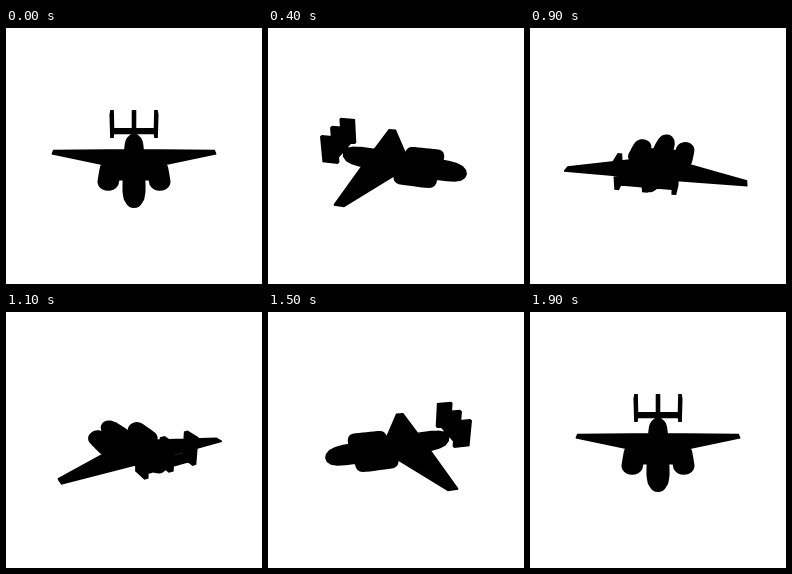
These frames come from a looping animation (256x256 px, 2000 ms). An HTML page:

```html
<!DOCTYPE html>
<html lang="en">
<head>
<meta charset="utf-8">
<title>Turning aircraft</title>
<style>
  html, body { margin: 0; width: 100%; height: 100%; overflow: hidden; background: #fff; }
  svg { display: block; width: 100%; height: 100%; }
</style>
</head>
<body>
<svg viewBox="0 0 256 256"><path id="plane"/></svg>
<script>
const STEP_MS = 100, STEPS = 20;
const CAMERA = 387, SIN_PITCH = 0.45, COS_PITCH = Math.sqrt(1 - SIN_PITCH ** 2);
const CENTER_X = 128, CENTER_Y = 135.4;

// Model axes: x along the wings, y up, z towards the nose.
const range = (count, fn) => Array.from({ length: count }, (_, i) => fn(i));

const ring = (x, y, z, rx, ry) => range(20, i => {
  const a = i * Math.PI / 10;
  return [x + rx * Math.cos(a), y + ry * Math.sin(a), z];
});

// Blunt-ended body along z, cut into convex sections; slope tilts its axis.
function pod({ x, y, tail, nose, radius, widen = 1, slope = 0 }) {
  const mid = (tail + nose) / 2, half = (nose - tail) / 2, sections = 16;
  const rings = range(sections + 1, i => {
    const u = -Math.cos(i * Math.PI / sections);
    const z = mid + half * u;
    const r = radius * Math.sqrt(Math.max(0, 1 - u ** 8));
    return ring(x, y + slope * z, z, r * widen, r);
  });
  return rings.slice(1).map((r, i) => [...rings[i], ...r]);
}

const box = (x0, x1, y0, y1, z0, z1) =>
  [x0, x1].flatMap(x => [y0, y1].flatMap(y => [z0, z1].map(z => [x, y, z])));

const fin = (x0, x1) => box(x0, x1, 6, 33, -67, -51);

const mirror = part => part.map(([x, y, z]) => [-x, y, z]);

const wing = [...box(0, 0, -1.5, 1.5, -31, 15), ...box(86.5, 86.5, -0.7, 0.7, -31, -22)];

const rightSide = [
  wing,
  fin(22.5, 26.5),
  ...pod({ x: 23.5, y: 0, tail: 4, nose: 45, radius: 8, widen: 1.25 })
];

const parts = [
  ...pod({ x: 0, y: 1, tail: -56, nose: 70.5, radius: 10.5, slope: -0.056 }),
  ...rightSide,
  ...rightSide.map(mirror),
  box(-22, 22, -1, 1, 0, 33),
  box(-25, 25, 10, 12, -66, -52),
  fin(-2.5, 2.5)
];

function project([x, y, z], sin, cos) {
  const side = x * cos + z * sin;
  const near = z * cos - x * sin;
  const scale = CAMERA / (CAMERA - near * COS_PITCH - y * SIN_PITCH);
  return [
    CENTER_X + side * scale,
    CENTER_Y - (y * COS_PITCH - near * SIN_PITCH) * scale
  ];
}

function hull(points) {
  const sorted = [...points].sort((a, b) => a[0] - b[0] || a[1] - b[1]);
  const chain = list => {
    const out = [];
    for (const p of list) {
      while (out.length > 1) {
        const [a, b] = out.slice(-2);
        if ((b[0] - a[0]) * (p[1] - a[1]) - (b[1] - a[1]) * (p[0] - a[0]) > 0) break;
        out.pop();
      }
      out.push(p);
    }
    return out.slice(0, -1);
  };
  return [...chain(sorted), ...chain(sorted.reverse())];
}

function outline(angle) {
  const sin = Math.sin(angle), cos = Math.cos(angle);
  return parts.map(part => {
    const edge = hull(part.map(p => project(p, sin, cos)));
    return 'M' + edge.map(p => p.map(v => v.toFixed(2)).join()).join('L') + 'Z';
  }).join('');
}

// The last pose repeats the first, so a full turn takes one step less.
const poses = range(STEPS, i => outline(i * 2 * Math.PI / (STEPS - 1)));
const plane = document.getElementById('plane');
let shown = -1;

function draw() {
  const step = Math.floor(performance.now() / STEP_MS) % STEPS;
  if (step !== shown) plane.setAttribute('d', poses[shown = step]);
  requestAnimationFrame(draw);
}
draw();
</script>
</body>
</html>
```
